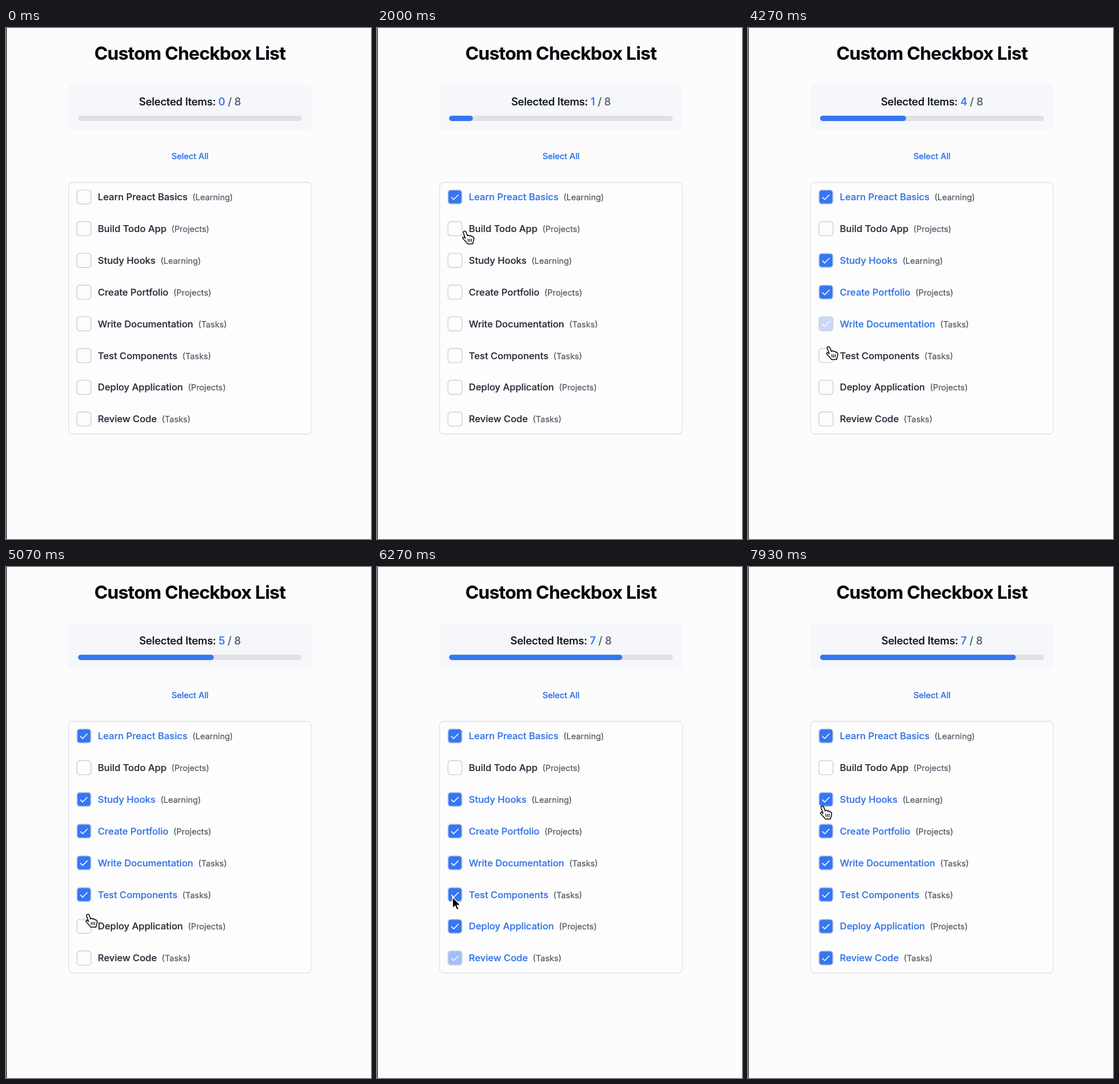
An HTML page for the animation above (8000 ms loop, 633 by 884 pixels).

```html
<!DOCTYPE html>
<html lang="en">
<head>
<meta charset="utf-8">
<title>Custom Checkbox List</title>
<style>
  html, body { margin: 0; width: 100%; height: 100%; overflow: hidden; background: #fcfcfd; }
  svg { display: block; }
  text { font-family: Inter, "Noto Sans", sans-serif; font-weight: 500; font-optical-sizing: none; }
  text, tspan { fill: currentColor; stroke: currentColor; stroke-width: .2px; }
  .mid { text-anchor: middle; }
  .title { font-size: 31.5px; font-weight: 700; letter-spacing: -.022em; color: #07090f; }
  .count { font-size: 18.4px; letter-spacing: -.01em; color: #0c0f16; }
  .blue { color: #3374e6; }
  .grey { color: #5c6370; }
  .link { font-size: 14.7px; letter-spacing: -.01em; }
  .name { font-size: 16.4px; color: #272d39; }
  .name.on { color: #3374e6; }
  .group { font-size: 14.4px; font-weight: 400; color: #505863; }
  .box { fill: #fdfdfe; stroke: #cccfd5; stroke-width: 1.4; }
  .fill { fill: #3576f3; }
</style>
</head>
<body>
<svg width="633" height="884" viewBox="0 0 633 884">
  <rect width="633" height="884" fill="#fcfcfd"/>
  <rect width="1.2" height="884" fill="#141416"/>
  <text class="title mid" x="319" y="55">Custom Checkbox List</text>
  <rect x="108" y="97.5" width="422" height="79" rx="8" fill="#f5f7fb"/>
  <text class="count mid" x="319" y="134.2">Selected Items: <tspan class="blue" id="count">0</tspan><tspan class="grey"> / 8</tspan></text>
  <rect x="125" y="151.7" width="388" height="9.2" rx="4.6" fill="#e0e1e5"/>
  <rect id="bar" class="fill" x="125" y="151.7" width="0" height="9.2" rx="4.6"/>
  <text class="link blue mid" x="319" y="227">Select All</text>
  <rect x="108.6" y="267" width="420.8" height="435.5" rx="7.5" fill="#fdfdfe" stroke="#e0e1e5" stroke-width="1.3"/>
  <g id="list"></g>
  <path id="arrow" d="M0 0V19.5L4.5 15.5L7.4 22.3L10.8 20.8L8 14.2H14Z" fill="#000" stroke="#fff" stroke-width="1.5"/>
  <g id="hand" stroke="#000" stroke-width="1.5" stroke-linecap="round" stroke-linejoin="round">
    <path fill="#fff" d="M-3.4 1.4C-4-1.4 .2-2.2 1.4 .6L3.8 7C4.6 5.4 7.4 5.6 8 7.6C9 6.2 11.4 6.8 11.8 8.8C13 7.8 15 9 15 11.2C15.4 15 13.6 17 13 21H4C2.2 17.6-1.6 15-4 11.6C-5.2 9.2-2.4 7.8 .2 11.2Z"/>
    <path fill="none" stroke-width="1.2" d="M4.8 12.4L5.2 17M7.8 12.4V17M10.8 12.4L10.6 17"/>
  </g>
</svg>
<script>
const LOOP = 8000, FADE = 100, GROW = 300;
const FIRST = 1835, LAST = 6225, PACE = 660, SKIPPED = 1;

const items = [
  ["Learn Preact Basics", "Learning"],
  ["Build Todo App", "Projects"],
  ["Study Hooks", "Learning"],
  ["Create Portfolio", "Projects"],
  ["Write Documentation", "Tasks"],
  ["Test Components", "Tasks"],
  ["Deploy Application", "Projects"],
  ["Review Code", "Tasks"]
];
const STEP = 388 / items.length;

// Pointer tip: time, x, y
const path = [
  [330, 521, 770], [1130, 119, 277], [1830, 129, 291], [2000, 153, 352.5],
  [2800, 135, 403], [3200, 137, 475.5], [5070, 143, 602], [6120, 136, 674],
  [6270, 131, 571], [6900, 117, 402], [7930, 130, 415]
];

const $ = id => document.getElementById(id);
const clamp = v => Math.max(0, Math.min(1, v));

function add(parent, tag, attrs, text = "") {
  const el = document.createElementNS("http://www.w3.org/2000/svg", tag);
  for (const k in attrs) el.setAttribute(k, attrs[k]);
  el.textContent = text;
  return parent.appendChild(el);
}

// The first row is ticked alone, the rest follow at an even pace
function tickTime(i) {
  if (i === SKIPPED) return Infinity;
  return i ? LAST - PACE * (items.length - 1 - i) : FIRST;
}

const rows = items.map(([name, group], i) => {
  const y = 292.3 + i * 54.88, list = $("list");
  add(list, "rect", { class: "box", x: 123, y: y - 12.2, width: 24.4, height: 24.4, rx: 5 });
  const mark = add(list, "g", {});
  add(mark, "rect", { class: "fill", x: 123.5, y: y - 11.7, width: 23.4, height: 23.4, rx: 4.6,
    stroke: "#b4c6e8" });
  add(mark, "path", { d: `M129.3 ${y + .8}l3.7 3.7l7.8 -8`, fill: "none", stroke: "#fff",
    "stroke-width": 1.6, "stroke-linecap": "round", "stroke-linejoin": "round" });
  const line = add(list, "text", { x: 159.3, y: y + 5.9 });
  const label = add(line, "tspan", { class: "name" }, name);
  add(line, "tspan", { class: "group", dx: 8.5 }, `(${group})`);
  return { at: tickTime(i), mark, label };
});

// CSS "ease": cubic-bezier(.25, .1, .25, 1)
function ease(x) {
  const curve = (a, b, s) => 3 * a * s * (1 - s) ** 2 + 3 * b * s * s * (1 - s) + s ** 3;
  let lo = 0, hi = 1;
  for (let i = 0; i < 20; i++) {
    const m = (lo + hi) / 2;
    if (curve(.25, .25, m) < x) lo = m; else hi = m;
  }
  return curve(.1, 1, lo);
}

function pointer(t) {
  const i = path.findIndex(p => p[0] > t);
  if (i < 0) return path[path.length - 1].slice(1);
  const [t0, x0, y0] = path[i - 1], [t1, x1, y1] = path[i];
  const u = (t - t0) / (t1 - t0), s = u * u * (3 - 2 * u);
  return [x0 + (x1 - x0) * s, y0 + (y1 - y0) * s];
}

function place(el, on, at) {
  el.setAttribute("visibility", on ? "visible" : "hidden");
  if (on) el.setAttribute("transform", at);
}

function draw(t) {
  let count = 0, width = 0;
  for (const { at, mark, label } of rows) {
    const on = t >= at;
    count += on;
    width += on ? STEP * ease(clamp((t - at) / GROW)) : 0;
    mark.setAttribute("opacity", on ? clamp((t - at) / FADE) : 0);
    label.setAttribute("class", on ? "name on" : "name");
  }
  $("count").textContent = count;
  $("bar").setAttribute("width", width);

  const seen = t >= path[0][0];
  const arrow = t < 950 || (t > 6190 && t < 6360);
  const at = seen ? `translate(${pointer(t).join(" ")})` : "";
  place($("arrow"), seen && arrow, at);
  place($("hand"), seen && !arrow, at);
}

const start = performance.now();
function frame() {
  draw((performance.now() - start) % LOOP);
  requestAnimationFrame(frame);
}
frame();
</script>
</body>
</html>
```
